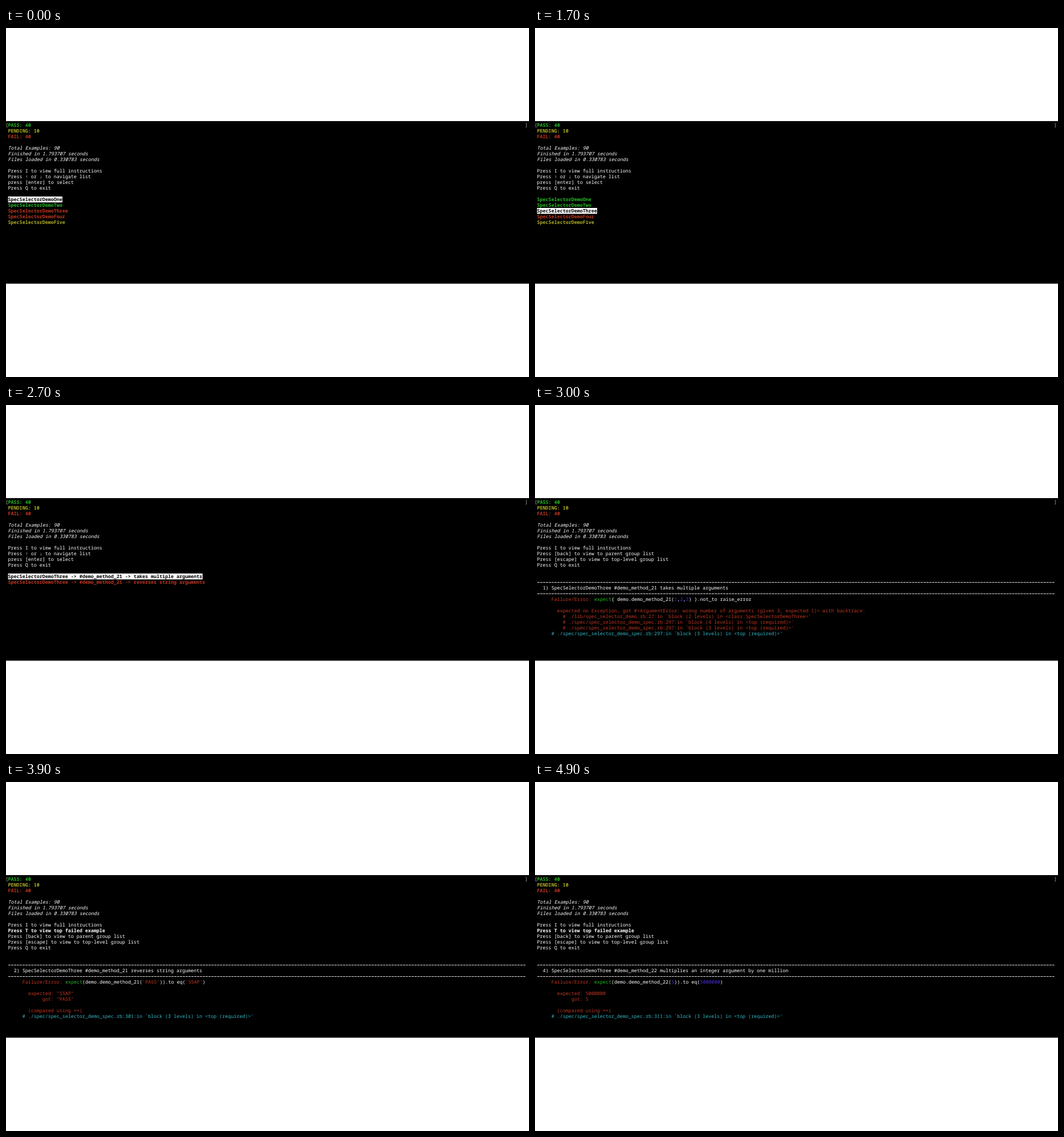
An HTML page with a canvas for the animation above (5 s loop, 917 by 611 pixels).

```html
<!DOCTYPE html>
<html lang="en">
<head>
<meta charset="utf-8">
<title>Spec selector</title>
<style>
  html, body { margin: 0; width: 100%; height: 100%; overflow: hidden; background: #fff; }
  canvas { display: block; }
</style>
</head>
<body>
<canvas id="stage" width="917" height="611"></canvas>
<script>
const ctx = document.getElementById('stage').getContext('2d');
const LOOP = 5000;
const LEFT = 3.6, TOP = 170, CELL = 5.015, ROW = 10;
const FONT = `${CELL / 0.6}px "Noto Sans Mono", "DejaVu Sans Mono", monospace`;
const RED = '#c23621', GREEN = '#25bc24', YELLOW = '#adad27',
      BLUE = '#492ee1', CYAN = '#33bbc8', WHITE = '#fff';

const columnX = col => LEFT + col * CELL;
const rowY = row => TOP + row * ROW;

function text(row, col, string, color = WHITE, style = '500') {
  ctx.font = `${style} ${FONT}`;
  ctx.fillStyle = color;
  ctx.fillText(string, columnX(col), rowY(row) + 3);
}

// Alternating colors and strings, written one after another.
function spans(row, col, ...parts) {
  for (let i = 0; i < parts.length; i += 2) {
    text(row, col, parts[i + 1], parts[i]);
    col += parts[i + 1].length;
  }
}

function rule(row) {
  ctx.strokeStyle = '#ddd';
  ctx.lineWidth = 1;
  ctx.setLineDash([4, CELL - 4]);
  ctx.beginPath();
  ctx.moveTo(LEFT + 0.4, rowY(row) + 0.5);
  ctx.lineTo(columnX(181), rowY(row) + 0.5);
  ctx.stroke();
  ctx.setLineDash([]);
}

function bracket(x, tick) {
  ctx.fillStyle = '#777';
  ctx.fillRect(x, 167, 1, 7);
  ctx.fillRect(x + tick, 167, 1, 1);
  ctx.fillRect(x + tick, 173, 1, 1);
}

function header() {
  ctx.fillStyle = '#fff';
  ctx.fillRect(0, 0, 917, 611);
  ctx.fillStyle = '#000';
  ctx.fillRect(0, 163, 917, 284.6);
  bracket(1, 1);
  bracket(912, -1);
  text(0, 0, 'PASS: 40', GREEN, 'bold');
  text(1, 0, 'PENDING: 10', YELLOW, 'bold');
  text(2, 0, 'FAIL: 40', RED, 'bold');
  ['Total Examples: 90', 'Finished in 1.793707 seconds', 'Files loaded in 0.330783 seconds']
    .forEach((line, i) => text(4 + i, 0, line, WHITE, 'italic 500'));
  text(8, 0, 'Press I to view full instructions');
}

function list(items, selected) {
  text(9, 0, 'Press ↑ or ↓ to navigate list');
  text(10, 0, 'press [enter] to select');
  text(11, 0, 'Press Q to exit');
  items.forEach(([label, color], i) => {
    const row = 13 + i;
    if (i === selected) {
      ctx.fillStyle = WHITE;
      ctx.fillRect(LEFT, rowY(row) - 5, label.length * CELL, ROW + 0.3);
    }
    text(row, 0, label, i === selected ? '#000' : color, 'bold');
  });
}

// Returns the first row below the title block.
function detailTop(number, title) {
  let row = 9;
  if (number > 1) text(row++, 0, 'Press T to view top failed example', WHITE, 'bold');
  text(row++, 0, 'Press [back] to view to parent group list');
  text(row++, 0, 'Press [escape] to view to top-level group list');
  text(row, 0, 'Press Q to exit');
  row += 3;
  rule(row);
  text(row + 1, 2, `${number}) ${GROUP} ${title}`);
  rule(row + 2);
  return row + 3;
}

const traceLine = (line, levels) =>
  `# ./spec/spec_selector_demo_spec.rb:${line}:in \`block (${levels} levels) in <top (required)>'`;

function errorDetail() {
  const row = detailTop(1, '#demo_method_21 takes multiple arguments');
  spans(row, 5, RED, 'Failure/Error: ', GREEN, 'expect', WHITE, '{ demo.demo_method_21(',
    BLUE, '1', WHITE, ',', BLUE, '2', WHITE, ',', BLUE, '3', WHITE, ') }.not_to raise_error');
  text(row + 2, 7, 'expected no Exception, got #<ArgumentError: wrong number of arguments ' +
    '(given 3, expected 1)> with backtrace:', RED);
  text(row + 3, 9, `# ./lib/spec_selector_demo.rb:27:in \`block (2 levels) in <class:${GROUP}>'`, RED);
  text(row + 4, 9, traceLine(297, 4), RED);
  text(row + 5, 9, traceLine(297, 3), RED);
  text(row + 6, 5, traceLine(297, 3), CYAN);
}

function compareDetail(number, method, title, got, expected, line) {
  const row = detailTop(number, `#${method} ${title}`);
  const color = got.startsWith('"') ? RED : BLUE;
  const literal = value => value.replaceAll('"', "'");
  spans(row, 5, RED, 'Failure/Error: ', GREEN, 'expect', WHITE, `(demo.${method}(`,
    color, literal(got), WHITE, ')).to eq(', color, literal(expected), WHITE, ')');
  text(row + 2, 7, `expected: ${expected}`, RED);
  text(row + 3, 12, `got: ${got}`, RED);
  text(row + 5, 7, '(compared using ==)', RED);
  text(row + 6, 5, traceLine(line, 3), CYAN);
}

const GROUP = 'SpecSelectorDemoThree';
const groups = [['One', GREEN], ['Two', GREEN], ['Three', RED], ['Four', RED], ['Five', YELLOW]]
  .map(([name, color]) => [`SpecSelectorDemo${name}`, color]);
const methods = Array.from({ length: 10 }, (_, i) => [`${GROUP} -> #demo_method_${21 + i}`, RED]);
const examples = ['takes multiple arguments', 'reverses string arguments']
  .map(name => [`${GROUP} -> #demo_method_21 -> ${name}`, RED]);

const scenes = [
  [0, () => list(groups, 0)],
  [500, () => list(groups, 1)],
  [1500, () => list(groups, 2)],
  [2000, () => list(methods, 0)],
  [2400, () => list(examples, 0)],
  [2900, errorDetail],
  [3600, () => compareDetail(2, 'demo_method_21', 'reverses string arguments', '"PASS"', '"SSAP"', 301)],
  [4500, () => compareDetail(3, 'demo_method_22', 'squares an integer argument', '5', '25', 307)],
  [4700, () => compareDetail(4, 'demo_method_22', 'multiplies an integer argument by one million',
    '5', '5000000', 311)]
];

ctx.textRendering = 'geometricPrecision';
ctx.fontKerning = 'none';
const startTime = performance.now();

function draw() {
  const time = (performance.now() - startTime) % LOOP;
  header();
  scenes.findLast(([from]) => time >= from)[1]();
  requestAnimationFrame(draw);
}
draw();
</script>
</body>
</html>
```
